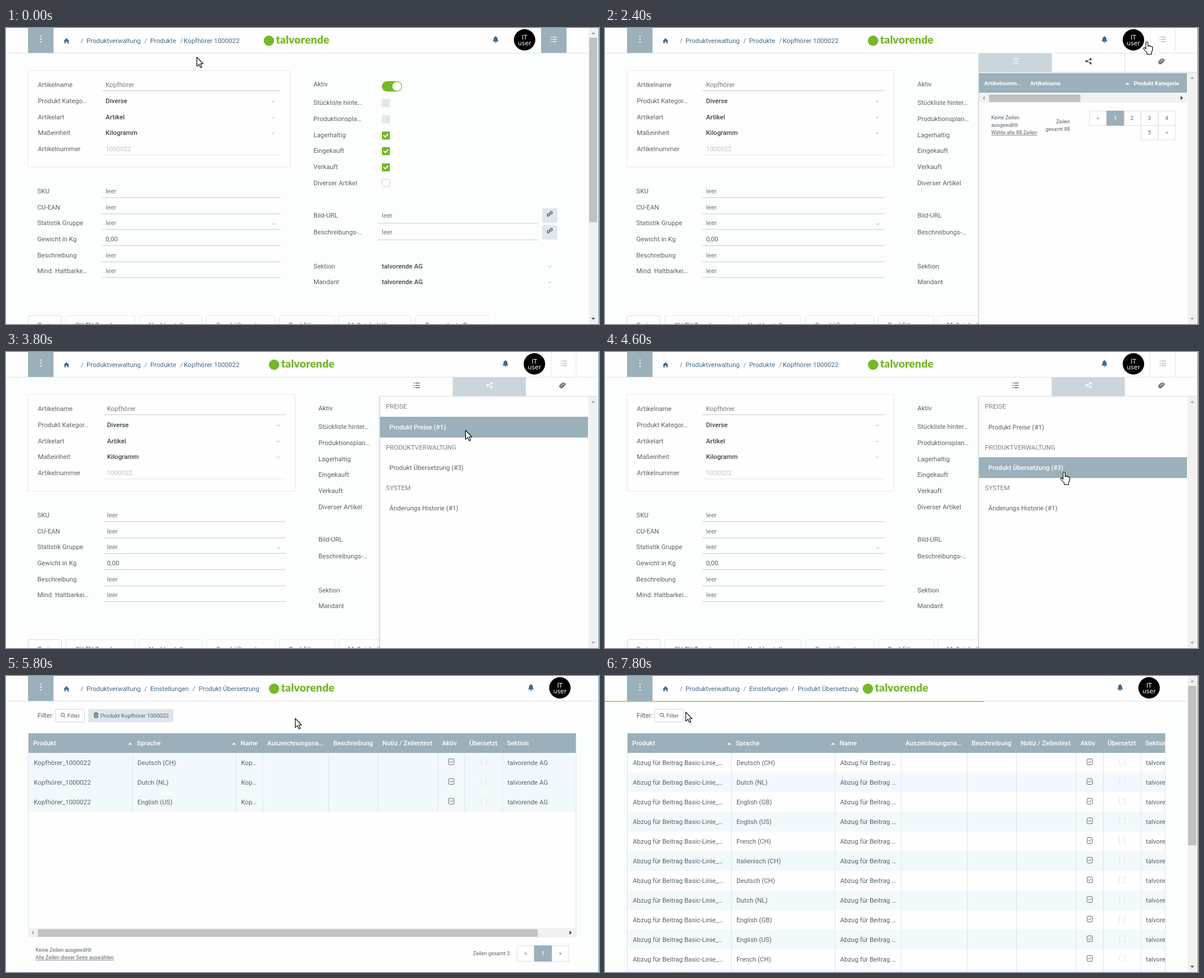
Animation, 1024 px wide and 512 px high, one loop 8000 ms. Source, as an HTML page with a canvas:

```html
<!DOCTYPE html>
<html lang="de">
<head>
<meta charset="utf-8">
<title>Produktverwaltung</title>
<style>
html, body { margin: 0; width: 100%; height: 100%; overflow: hidden; background: #fcfefd; }
canvas { display: block; width: 1024px; height: 512px; }
</style>
</head>
<body>
<canvas id="stage" width="1024" height="512"></canvas>
<script>
const ctx = document.getElementById('stage').getContext('2d', { alpha: false });
const LOOP = 8000, TICK = 200;
const BRAND = 'talvorende', COMPANY = BRAND + ' AG';
const C = {
  page: '#fcfefd', white: '#fefefe', steel: '#9bb0bb', pale: '#cad6dc', link: '#40698a',
  text: '#56636a', strong: '#3b484f', value: '#707a80', faint: '#bfc4c6', line: '#c9ced1',
  edge: '#e4e8ea', green: '#76b82a', track: '#f1f1f1', thumb: '#c1c1c1', ink: '#444b50'
};

function rect(x, y, w, h, color) {
  ctx.fillStyle = color;
  ctx.fillRect(x, y, w, h);
}
function box(x, y, w, h, fill, stroke, radius = 0) {
  ctx.beginPath();
  ctx.roundRect(x, y, w, h, radius);
  if (fill) { ctx.fillStyle = fill; ctx.fill(); }
  if (stroke) { ctx.strokeStyle = stroke; ctx.lineWidth = 1; ctx.stroke(); }
}
function disc(x, y, r, color) {
  ctx.fillStyle = color;
  ctx.beginPath();
  ctx.arc(x, y, r, 0, 7);
  ctx.fill();
}
function text(s, x, y, color = C.text, size = 11.2, weight = 400, align = 'left', family = 'Roboto') {
  ctx.font = `${weight} ${size}px ${family}, sans-serif`;
  ctx.textAlign = align;
  ctx.fillStyle = color;
  ctx.fillText(s, x, y + size * 0.36);
}
function underlined(s, x, y) {
  text(s, x, y, C.text, 8.96);
  rect(x, y + 4, ctx.measureText(s).width, 1, '#8a9398');
}
function path(d, x, y, { stroke, fill, width = 1 }) {
  const shape = new Path2D(d);
  ctx.save();
  ctx.translate(x, y);
  ctx.lineWidth = width;
  ctx.lineJoin = ctx.lineCap = 'round';
  if (fill) { ctx.fillStyle = fill; ctx.fill(shape); }
  if (stroke) { ctx.strokeStyle = stroke; ctx.stroke(shape); }
  ctx.restore();
}
function triangle(x, y, dir, color, size = 3.5) {
  ctx.save();
  ctx.translate(x, y);
  ctx.rotate({ up: 0, right: 1, down: 2, left: 3 }[dir] * Math.PI / 2);
  ctx.fillStyle = color;
  ctx.beginPath();
  ctx.moveTo(-size, size / 2);
  ctx.lineTo(0, -size / 2);
  ctx.lineTo(size, size / 2);
  ctx.fill();
  ctx.restore();
}

const chevron = (x, y) => path('M-2.3-1 0 1.2 2.3-1', x, y, { stroke: '#a3acb1' });
const clip = (x, y, color) =>
  path('M3-1.5-1 2.5a1.2 1.2 0 0 1-1.7-1.7L1.5-3.4a2 2 0 0 1 2.8 2.8L-.5 4.1A2.8 2.8 0 0 1-4.4 .2L0-4.2', x, y, { stroke: color, width: 1.2 });
const chain = (x, y) =>
  path('M-1 1 1-1M0-2 1.6-3.6A1.9 1.9 0 0 1 4.2-1L2.5.7M0 2-1.6 3.6A1.9 1.9 0 0 1-4.2 1L-2.5-.7', x, y, { stroke: C.ink, width: 1.3 });
const bell = x =>
  path('M-5 3.5C-3.5 2-3.5 0-3.3-2A3.3 3.3 0 0 1-.6-5V-6H.6V-5A3.3 3.3 0 0 1 3.3-2C3.5 0 3.5 2 5 3.5ZM-1.5 4.3h3a1.5 1.5 0 0 1-3 0Z', x, 20, { fill: C.link });
function listIcon(x, y, color) {
  for (const dy of [-4, 0, 4]) {
    rect(x - 5, y + dy - 0.5, 1.5, 1.5, color);
    rect(x - 2, y + dy - 0.5, 7.5, 1.2, color);
  }
}
function shareIcon(x, y, color) {
  path('M4-3.5-3 0 4 3.5', x, y, { stroke: color });
  for (const [dx, dy] of [[3.5, -3.5], [-3.5, 0], [3.5, 3.5]]) disc(x + dx, y + dy, 1.9, color);
}

function vScroll(top, thumbEnd) {
  rect(1006, top, 16, 512 - top, C.track);
  triangle(1014, top + 9, 'up', '#a3a3a3');
  if (thumbEnd) rect(1007, 17, 14, thumbEnd - 17, C.thumb);
  triangle(1014, 503, 'down', thumbEnd ? '#505050' : '#a3a3a3');
}
function hScroll(x, y, right, from, to) {
  rect(x, y, right - x, 16, C.track);
  triangle(x + 8, y + 8, 'left', '#a3a3a3');
  rect(from, y + 2, to - from, 13, C.thumb);
  triangle(right - 9, y + 8, 'right', '#333');
}
function pageCell(label, x, y, h) {
  const active = label === '1';
  box(x + .5, y + .5, 29.5, h, active ? C.steel : C.white, active ? C.steel : '#dde1e3');
  text(label, x + 15, y + h / 2 + .5, active ? '#fff' : C.text, 8.96, active ? 500 : 400, 'center');
}

// shift: offset of the centred logo when no page scrollbar is shown
function header({ crumbs, shift, bellX, avatarX, selected }) {
  rect(0, 0, 1024, 43, C.white);
  rect(0, 43, 1024, 1, '#dfe3e5');
  rect(38, 0, 44, 43, C.steel);
  for (const y of [14, 19, 24]) disc(60.5, y, 1.2, '#fff');
  path('M-5 .5 0-4.5 5 .5H3.7V4.5H1.2V1.2H-1.2V4.5H-3.7V.5Z', 104.5, 22, { fill: C.link });
  crumbs.forEach(([slash, x, label]) => {
    text('/', slash, 22, '#6f7c84');
    text(label, x, 22, C.link);
  });
  if (selected) {
    rect(307, 15, 50, 14, C.steel);
    text('Kopfhörer', 307, 22, '#fff');
  }
  disc(454 + shift, 22, 9, C.green);
  text(BRAND, 466 + shift, 20.5, C.green, 19, 900, 'left', 'Lato');
  bell(bellX);
  disc(avatarX, 20.5, 18.5, '#000');
  text('IT', avatarX, 16, '#fff', 10.5, 400, 'center', '"DejaVu Sans"');
  text('user', avatarX, 26, '#fff', 10.5, 400, 'center', '"DejaVu Sans"');
}

const PRODUCT_CRUMBS = [[129, 139, 'Produktverwaltung'], [239, 249, 'Produkte'], [301, 307, 'Kopfhörer 1000022']];
const TABLE_CRUMBS = [[129, 139, 'Produktverwaltung'], [239, 249, 'Einstellungen'], [322, 333, 'Produkt Übersetzung']];

// The letter after "|" only fits in the wider layout.
const TOP_FIELDS = [
  ['Artikelname', 98, 'Kopfhörer', 'line'], ['Produkt Katego|r…', 126, 'Diverse', 'pick'],
  ['Artikelart', 154, 'Artikel', 'pick'], ['Maßeinheit', 181, 'Kilogramm', 'pick'],
  ['Artikelnummer', 209, '1000022', 'off']
];
const LOW_FIELDS = [
  ['SKU', 282], ['CU-EAN', 310], ['Statistik Gruppe', 337], ['Gewicht in Kg', 365, '0,00'],
  ['Beschreibung', 393], ['Mind. Haltbarke|i…', 420]
];
const FLAGS = [
  ['Stückliste hinte|r…', 129, 'off'], ['Produktionspla|n…', 157, 'off'], ['Lagerhaltig', 185, 'on'],
  ['Eingekauft', 212, 'on'], ['Verkauft', 240, 'on'], ['Diverser Artikel', 268, '']
];
const TABS = [
  [38, 96, 'Preis'], [103, 223, 'CU-TU Zuordnung'], [230, 339, 'Nachbestellung'], [346, 465, 'Geschäftspartner'],
  [472, 568, 'Buchführung'], [574, 700, 'Maßeinheit Umre…'], [707, 833, 'Zugeordnete Pro…']
];

function productPage(wide) {
  const grow = wide ? 8.5 : 0, valueX = wide ? 174.5 : 172, lineX = wide ? 168 : 166;
  const rightX = 531 + grow;
  const fit = s => s.replace(/\|(.)/, wide ? '$1' : '');
  const underline = (y, color) => rect(lineX, y, 474.5 + grow - lineX, 1, color);

  box(38.5, 73.5, 452 + grow, 167, C.white, C.edge, 1);
  for (const [label, y, value, kind] of TOP_FIELDS) {
    text(fit(label), 55, y);
    const pick = kind === 'pick';
    text(value, valueX, y, pick ? C.strong : kind === 'off' ? C.faint : C.value, 11.2, pick ? 500 : 400);
    if (pick) chevron(461.5 + grow, y + 1);
    else underline(y + 10.5 | 0, kind === 'off' ? '#e6e8e9' : C.line);
  }
  for (const [label, y, value] of LOW_FIELDS) {
    text(fit(label), 54, y);
    text(value || 'leer', valueX, y, value ? C.text : C.value);
    underline(y + 11, C.line);
  }
  chevron(462.5 + grow, 339);

  text('Aktiv', rightX, 97);
  for (const [label, y, state] of FLAGS) {
    text(fit(label), rightX, y);
    if (wide) continue;
    if (state) box(649, y - 6, 14, 14, state === 'on' ? C.green : '#e4e5e5', null, 1.5);
    else box(649.5, y - 6.5, 13, 13, '#fff', '#cfd4d6', 1);
    if (state === 'on') path('M-3.5 0-1 2.6 3.6-2.4', 656, y + 1, { stroke: '#fff', width: 1.8 });
  }
  [['Bild-URL', 324], ['Beschreibungs-…', 353]].forEach(([label, y]) => {
    text(label, rightX, y);
    if (wide) return;
    text('leer', 649, y, C.value);
    rect(642, y + 13, 278, 1, C.line);
    box(926, y - 12, 26, 25, '#dfe6ec', null, 2);
    chain(939, y - 2.5);
  });
  [['Sektion', 412], ['Mandant', 439]].forEach(([label, y]) => {
    text(label, rightX, y);
    if (wide) return;
    text(COMPANY, 649, y, C.strong, 11.2, 500);
    chevron(939, y + 1);
  });
  if (!wide) {
    box(649, 92, 35, 18, C.green, null, 9);
    disc(675, 101, 7.8, '#fff');
  }
  TABS.forEach(([from, to, label], i) => {
    box(from + .5, 497.5, to - from - 1, 30, C.white, i ? C.edge : '#d3dadd', 2);
    text(label, from + 16.5, 513.5);
  });
}

function listPanel() {
  rect(646, 78, 359, 34, C.steel);
  text('Artikelnumm…', 655, 96, '#fff', 9.6, 700);
  text('Artikelname', 734, 96, '#fff', 9.6, 700);
  triangle(902, 96, 'up', '#fff');
  text('Produkt Kategorie', 913, 96, '#fff', 9.6, 700);
  hScroll(646, 113, 1005, 663, 821);
  text('Keine Zeilen', 667, 155, C.text, 8.96);
  text('ausgewählt', 667, 168, C.text, 8.96);
  underlined('Wähle alle 88 Zeilen', 667, 181);
  text('Zeilen', 803, 162, C.text, 8.96, 400, 'right');
  text('gesamt 88', 803, 175, C.text, 8.96, 400, 'right');
  ['«', '2', '3', '4', '5', '»', '1'].forEach(label => {
    const col = { '«': 0, '1': 1, '2': 2, '3': 3, '4': 4, '5': 3, '»': 4 }[label];
    pageCell(label, Math.round(836 + col * 29.7), '5»'.includes(label) ? 168 : 143, 25);
  });
}
function linkPanel(pointerY) {
  const groups = [['PREISE', 94, 'Produkt Preise (#1)'], ['PRODUKTVERWALTUNG', 165, 'Produkt Übersetzung (#3)'],
    ['SYSTEM', 235, 'Änderungs Historie (#1)']];
  for (const [title, y, item] of groups) {
    const itemY = Math.round(y / 5) * 5 + (y === 94 ? 35 : 35);
    const hover = Math.abs(pointerY - itemY) < 18;
    text(title, 656, y, '#78838a');
    if (hover) rect(646, itemY - 18, 359, 36, C.steel);
    text(item, 662, itemY, hover ? '#fff' : C.text, 11.2, hover ? 500 : 400);
  }
}
function sidePanel(tab, loaded, pointerY) {
  ctx.save();
  ctx.shadowColor = 'rgba(80,100,110,.35)';
  ctx.shadowBlur = 4;
  rect(645.5, 77, 378, 440, C.white);
  ctx.restore();
  rect(645, 44, 378, 33, C.white);
  rect(645, 76, 378, 1, '#d4dadd');
  rect(645 + tab * 126, 44, 127, 32, C.pale);
  [771, 897].forEach(x => rect(x, 44, 1, 32, '#dfe4e6'));
  const tint = i => i === tab ? '#fff' : C.ink;
  listIcon(709, 57.5, tint(0));
  shareIcon(835, 57.5, tint(1));
  clip(961, 57.5, tint(2));
  rect(645, 77, 1, 435, '#c5ced3');
  if (tab) linkPanel(pointerY);
  else if (loaded) listPanel();
  vScroll(77);
}

const LANGUAGES = ['Deutsch (CH)', 'Dutch (NL)', 'English (GB)', 'English (US)', 'French (CH)', 'Italienisch (CH)'];

function tablePage(all, tagged) {
  const right = all ? 967 : 984, d = all ? 68 : 0;
  rect(38, 44, right - 37, 468, C.white);
  text('Filter:', 54.5, 68);
  box(85.5, 57.5, 50, 22, C.white, '#d3d8db', 2);
  path('M1 1 3.8 3.8M2-1.4A3 3 0 1 1-4-1.4 3 3 0 0 1 2-1.4', 99, 68.5, { stroke: C.text });
  text('Filter', 106, 68.5, C.text, 9.6);
  if (tagged) {
    box(142, 57, 147, 23, '#dde6ea', null, 2);
    path('M-4-3H4M-1.5-4.5h3M-3-1V4H3V-1ZM-1 0V3M1 0V3', 155.5, 68, { stroke: C.ink });
    text('Produkt Kopfhörer 1000022', 163, 68.5, C.text, 9.6);
  }

  ctx.save();
  ctx.beginPath();
  ctx.rect(38, 98, right - 37, 414);
  ctx.clip();
  rect(39, 99, right - 39, 34, C.steel);
  const heads = [[47, 'Produkt'], [226, 'Sprache'], [405, 'Name'], [451 + d, 'Auszeichnungsna…'], [565 + d, 'Beschreibung'],
    [650 + d, 'Notiz / Zeilentext'], [753 + d, 'Aktiv'], [800 + d, 'Übersetzt'], [865 + d, 'Sektion']];
  heads.forEach(([x, label]) => text(label, x, 116, '#fff', 11.2, 500));
  triangle(214.5, 117, 'up', '#fff');
  triangle(393.5, 117, 'up', '#fff');

  const rows = all ? 12 : 3;
  for (let i = 0; i < rows; i++) {
    const y = 150 + i * 34;
    if (!all || i % 2) rect(39, y - 17, right - 39, 34, '#f2f9fc');
    text(all ? 'Abzug für Beitrag Basic-Linie_…' : 'Kopfhörer_1000022', 48, y);
    text(all ? LANGUAGES[i % 6] : LANGUAGES[[0, 1, 3][i]], 227, y);
    text(all ? 'Abzug für Beitrag …' : 'Kop…', 406, y);
    box(764.5 + d, y - 6.5, 9, 10, null, '#6b7479', 1.5);
    path('M-2-.5-.5 1 2.2-2', 769 + d, y - 1, { stroke: C.ink });
    path('M-2.5-5H-4.5V5H-2.5M2.5-5H4.5V5H2.5', 825 + d, y - 1.5, { stroke: '#dfe4e6' });
    text(COMPANY, 866 + d, y);
  }
  [218, 397, 443 + d, 557 + d, 642 + d, 745 + d, 792 + d, 857 + d].forEach(x => rect(x, 133, 1, rows * 34, '#dde5e9'));
  rect(38, 99, 1, all ? 413 : 353, '#dde3e6');
  rect(right, 99, 1, all ? 413 : 353, '#dde3e6');
  ctx.restore();

  if (all) return;
  hScroll(38, 436, 984, 55, 918);
  text('Keine Zeilen ausgewählt', 51, 474, C.text, 8.96);
  underlined('Alle Zeilen dieser Seite auswählen', 51, 487);
  text('Zeilen gesamt 3', 870, 480, C.text, 8.96, 400, 'right');
  ['«', '»', '1'].forEach(label => pageCell(label, { '«': 882, '1': 912, '»': 942 }[label], 466, 27));
}

// time, x, y, pointer shape until the next entry
const POINTER = [
  [0, 329, 50, 'arrow'], [200, 336, 14, 'arrow'], [600, 68, 133, 'arrow'], [800, 68, 133, 'arrow'],
  [1200, 357, 14, 'beam'], [1400, 483, 25, 'hand'], [1600, 640, 31, 'arrow'], [2000, 934, 22, 'hand'],
  [2400, 929, 23, 'hand'], [2800, 822, 50, 'hand'], [3200, 799, 80, 'hand'], [3400, 798, 88, 'arrow'],
  [4400, 786, 205, 'hand'], [4600, 786, 207, 'hand'], [5000, 786, 207, 'arrow'], [5600, 510, 78, 'arrow'],
  [5800, 499, 73, 'arrow'], [6600, 150, 66, 'hand'], [7000, 150, 66, 'arrow'], [7800, 139, 62, 'arrow']
];
function pointerAt(t) {
  const next = POINTER.findIndex(p => p[0] > t);
  const [t0, x0, y0, kind] = next < 0 ? POINTER.at(-1) : POINTER[next - 1];
  const [t1, x1, y1] = next < 0 ? [t0 + 1, x0, y0] : POINTER[next];
  const k = Math.min(1, (t - t0) / (t1 - t0));
  return { x: Math.round(x0 + (x1 - x0) * k), y: Math.round(y0 + (y1 - y0) * k), kind };
}
function drawPointer({ x, y, kind }) {
  const ink = { fill: '#fff', stroke: '#000', width: 1.1 };
  if (kind === 'arrow') path('M.5.5V16.2L4.2 12.8 6.8 18.6 9.2 17.5 6.7 11.8H11.5Z', x, y, ink);
  else if (kind === 'beam') path('M-3 0H-1L0 1 1 0H3M0 1V15M-3 16H-1L0 15 1 16H3', x, y, { stroke: '#000' });
  else path('M5 13V2.5a1.75 1.75 0 0 1 3.5 0V8.5a1.6 1.6 0 0 1 3 .3 1.5 1.5 0 0 1 2.7.6 1.4 1.4 0 0 1 2.3 1V15.5L14.5 19V22.5H7V19.5L1 13a1.5 1.5 0 0 1 2-2Z', x, y, ink);
}

function progress(t) {
  if (t >= 2800 && t < 3400) return 1024 * (t - 2600) / 600;
  if (t >= 4800 && t < 5200) return 1024 * (t - 4600) / 600;
  if (t >= 7000) return 655 * (t - 6800) / 1000;
  return 0;
}

function draw(t) {
  const pointer = pointerAt(t);
  const table = t >= 5000, open = t >= 2200 && !table, all = t >= 7400;
  const scrolls = t < 2200 || all;
  const bar = progress(t);
  rect(0, 0, 1024, 512, C.page);
  header({
    crumbs: table ? TABLE_CRUMBS : PRODUCT_CRUMBS,
    shift: scrolls ? 0 : 9,
    bellX: all ? 889.5 : table ? 906.5 : open ? 862.5 : 845.5,
    avatarX: all ? 939.5 : table ? 956.5 : open ? 912.5 : 895.5,
    selected: t >= 1200 && t < 2200
  });
  if (table) tablePage(all, t < 7000);
  else productPage(open);
  if (bar) rect(0, 43, bar, 2, all ? '#a9d671' : '#95c83f');
  if (open) {
    rect(941, 0, 1, 43, C.edge);
    rect(984, 0, 1, 43, C.edge);
    listIcon(963, 19.5, C.steel);
    sidePanel(t < 2800 ? 0 : 1, t >= 2400, pointer.y);
  } else if (!table) {
    rect(924, 0, 44, 43, C.steel);
    listIcon(945.5, 19.5, '#fff');
  }
  if (scrolls) vScroll(0, all ? 293 : 336);
  rect(1022, 0, 1, 512, C.white);
  rect(1023, 0, 1, 512, '#5f98a3');
  drawPointer(pointer);
}

ctx.textBaseline = 'alphabetic';
const start = performance.now();
function frame() {
  const t = (performance.now() - start) % LOOP;
  draw(Math.floor(t / TICK) * TICK);
  requestAnimationFrame(frame);
}
frame();
</script>
</body>
</html>
```
